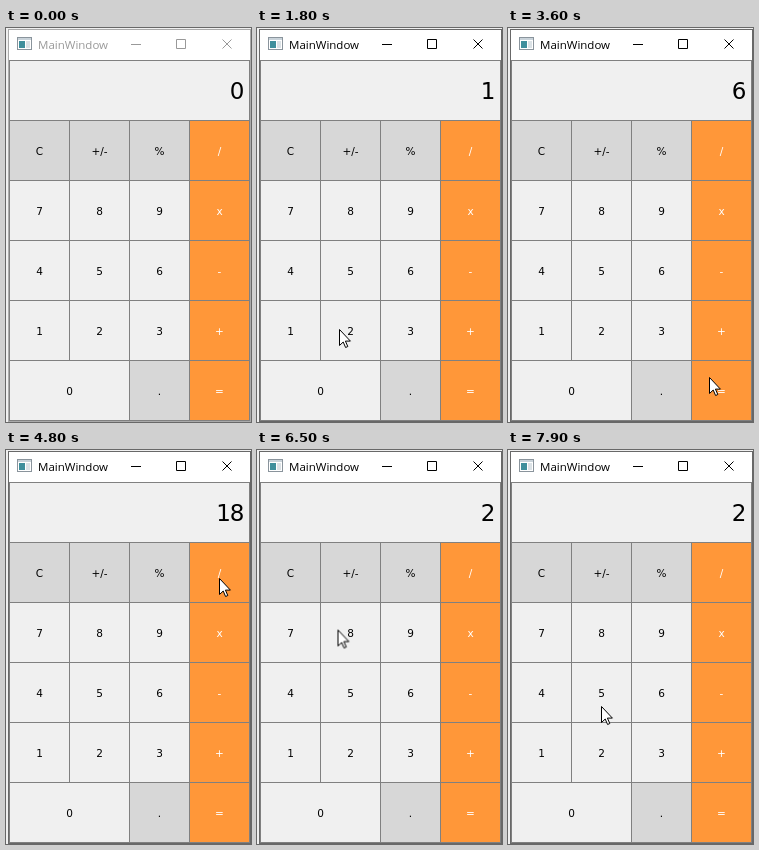
Animation, 245 px wide and 394 px high, one loop 8 s. Source, as an HTML page:

```html
<!DOCTYPE html>
<html lang="en">
<head>
<meta charset="utf-8">
<title>Calculator</title>
<style>
html, body { margin: 0; width: 100%; height: 100%; overflow: hidden; background: #f0f0f0; }
body { position: relative; }
.window {
  position: absolute; left: 2px; top: 1px; width: 241px; height: 391px;
  border: 1px solid; background: #fff;
  animation: focus 8s step-end infinite;
}
.bar { position: absolute; left: 0; top: 0; width: 241px; height: 30px; animation: ink 8s step-end infinite; }
.bar b { position: absolute; left: 29px; top: 6px; font: 11.5px/17px "Open Sans", "Noto Sans", sans-serif; }
.bar svg { position: absolute; left: 0; top: 0; }
.pad {
  position: absolute; left: 0; top: 30px; width: 239px; height: 359px; padding: 1px;
  display: grid; grid-template: repeat(6, 59px) / repeat(4, 59px); gap: 1px;
  background: #808080; color: #000;
  font: 10.5px/59px "DejaVu Sans", sans-serif; text-align: center;
}
.key { position: relative; isolation: isolate; box-sizing: border-box; height: 59px; padding-top: 1px; line-height: 58px; background: #f0f0f0; }
.fn { background: #d7d7d7; }
.op { background: #ff9739; color: #fff; }
.zero { grid-column: span 2; }
.screen { grid-column: span 4; height: 59px; overflow: hidden; background: #f0f0f0; }
.reel { font-size: 23px; letter-spacing: -1.3px; text-align: right; padding: 1px 6px 0 0; animation: reel 8s step-end infinite; }
.reel div { height: 60px; }

/* short flash while a key is held down */
.tap::before {
  content: ""; position: absolute; inset: 0; z-index: -1; opacity: 0;
  background: linear-gradient(#dadbde, #f6f7fa);
  animation: tap 8s step-end var(--at) infinite;
}
.fn.tap::before { background: linear-gradient(#bebebe, #d7d7d7); }
.op.tap::before { background: linear-gradient(#ff7832, #ff9739); }
.cursor { position: absolute; left: 0; top: 0; animation: cursor 8s infinite; }

@keyframes focus { 0% { border-color: #aaa; } 18.75%, 100% { border-color: #686868; } }
@keyframes ink { 0% { color: #999; } 18.75%, 100% { color: #000; } }
@keyframes tap { 0% { opacity: 1; } 1.25%, 100% { opacity: 0; } }
@keyframes reel {
  0% { transform: translateY(0); }
  20% { transform: translateY(-60px); }
  26.25% { transform: translateY(-120px); }
  38.75% { transform: translateY(-180px); }
  48.75% { transform: translateY(-240px); }
  68.75% { transform: translateY(-300px); }
  77.5% { transform: translateY(-360px); }
  85% { transform: translateY(-420px); }
  96.25%, 100% { transform: translateY(-360px); }
}
/* the pointer advances ten times a second */
@keyframes cursor {
  0% { transform: translate(260px, 400px); animation-timing-function: step-end; }
  12.5% { transform: translate(226px, 386px); animation-timing-function: steps(4); }
  17.5% { transform: translate(40px, 305px); animation-timing-function: steps(2); }
  20% { transform: translate(36px, 304px); animation-timing-function: steps(2); }
  22.5% { transform: translate(82px, 301px); animation-timing-function: steps(2); }
  25%, 26.25% { transform: translate(92px, 301px); animation-timing-function: steps(3); }
  30%, 32.5% { transform: translate(212px, 299px); animation-timing-function: steps(3); }
  36.25%, 38.75% { transform: translate(150px, 243px); animation-timing-function: steps(4); }
  43.75% { transform: translate(196px, 345px); animation-timing-function: step-end; }
  45% { transform: translate(201px, 349px); animation-timing-function: steps(2); }
  47.5%, 48.75% { transform: translate(206px, 361px); animation-timing-function: steps(5); }
  55% { transform: translate(176px, 183px); animation-timing-function: step-end; }
  56.25% { transform: translate(156px, 165px); animation-timing-function: steps(2); }
  58.75% { transform: translate(190px, 133px); animation-timing-function: step-end; }
  60%, 62.5% { transform: translate(213px, 128px); animation-timing-function: step-end; }
  63.75% { transform: translate(183px, 150px); animation-timing-function: step-end; }
  65%, 68.75% { transform: translate(138px, 180px); animation-timing-function: steps(3); }
  72.5% { transform: translate(231px, 322px); animation-timing-function: steps(2); }
  75% { transform: translate(216px, 347px); animation-timing-function: step-end; }
  76.25%, 77.5% { transform: translate(214px, 352px); animation-timing-function: steps(4); }
  82.5%, 85% { transform: translate(36px, 122px); animation-timing-function: steps(3); }
  88.75% { transform: translate(104px, 181px); animation-timing-function: steps(4); }
  93.75% { transform: translate(72px, 300px); animation-timing-function: step-end; }
  95%, 96.25% { transform: translate(65px, 303px); animation-timing-function: steps(2); }
  98.75%, 100% { transform: translate(93px, 256px); animation-timing-function: step-end; }
}
</style>
</head>
<body>
<div class="window">
  <div class="bar">
    <svg width="241" height="30" fill="none" stroke="currentColor">
      <g stroke="none">
        <path d="M8 7h15v13H8z" fill="#8a949c"/>
        <path d="M9 8h13v2H9z" fill="#c9d3da"/>
        <path d="M9 10h13v9H9z" fill="#fff"/>
        <path d="M10 11h6v7h-6z" fill="#3f8f9c"/>
        <path d="M17 11h4v7h-4z" fill="#dbe2e6"/>
      </g>
      <path d="M122 14.5h10M167.5 9.5h9v9h-9z"/>
      <path d="M213.5 9.5l9 9M222.5 9.5l-9 9"/>
    </svg>
    <b>MainWindow</b>
  </div>
  <div class="pad">
    <div class="screen"><div class="reel">
      <div>0</div><div>1</div><div>12</div><div>6</div><div>18</div><div>9</div><div>2</div><div></div>
    </div></div>
    <div class="key fn tap" style="--at:6.7s">C</div>
    <div class="key fn">+/-</div>
    <div class="key fn">%</div>
    <div class="key op tap" style="--at:5s">/</div>
    <div class="key">7</div>
    <div class="key">8</div>
    <div class="key tap" style="--at:5.4s">9</div>
    <div class="key op">x</div>
    <div class="key">4</div>
    <div class="key">5</div>
    <div class="key tap" style="--at:3s">6</div>
    <div class="key op">-</div>
    <div class="key">1</div>
    <div class="key">2</div>
    <div class="key">3</div>
    <div class="key op">+</div>
    <div class="key zero">0</div>
    <div class="key fn">.</div>
    <div class="key op">=</div>
  </div>
</div>
<svg class="cursor" width="13" height="20">
  <path d="M.5.5v16l3.7-3.5 2.4 5.5 2.2-1-2.4-5.4h5z" fill="#fff" stroke="#000"/>
</svg>
</body>
</html>
```
